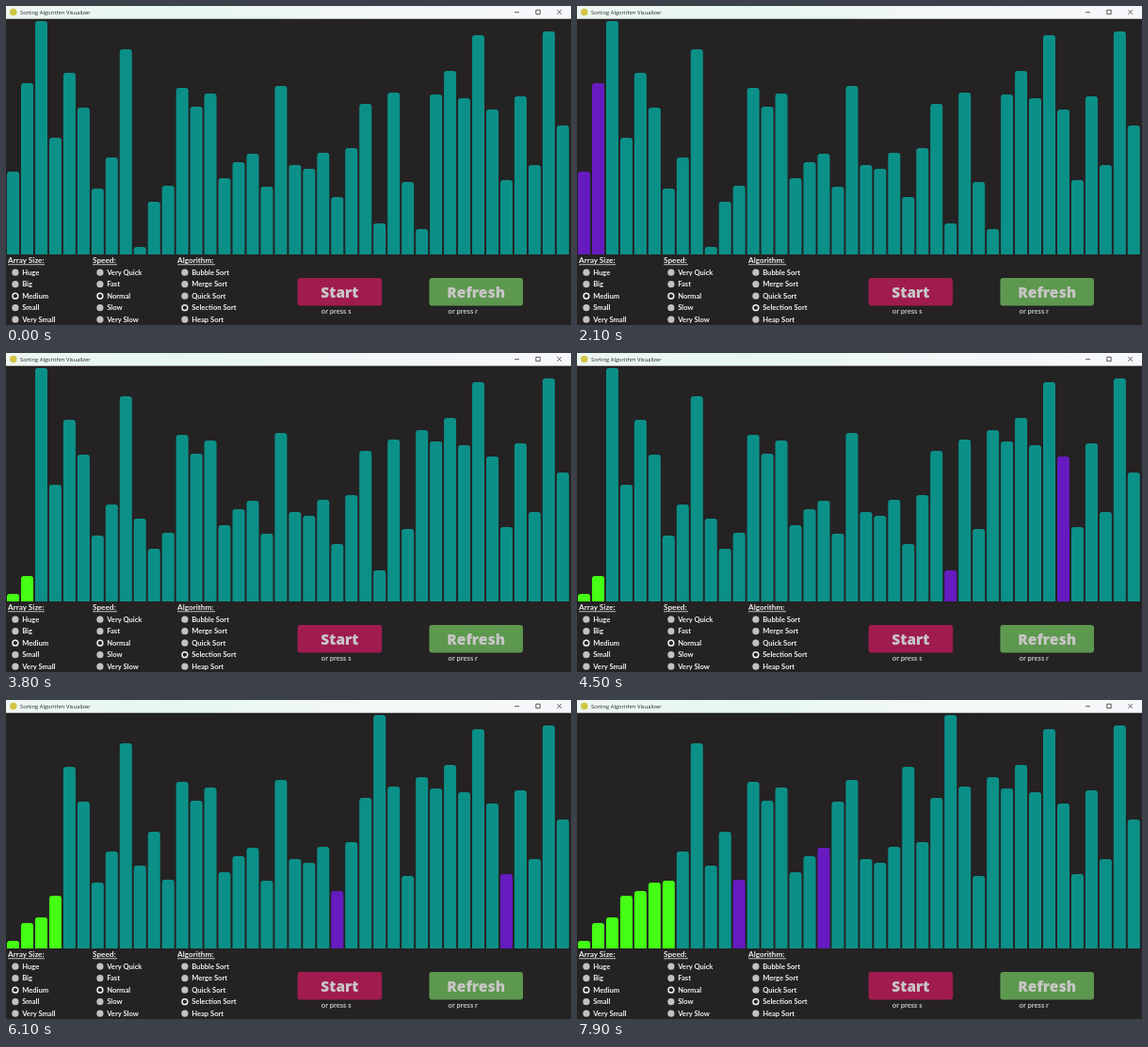
Recreate the animation shown at these times as an HTML page. Size 600 by 339 pixels, loop 8000 ms.

```html
<!DOCTYPE html>
<html lang="en">
<head>
<meta charset="utf-8">
<title>Sorting Algorithm Visualizer</title>
<style>
  html, body { margin: 0; width: 100%; height: 100%; overflow: hidden; background: #242223; }
  svg { display: block; width: 100vw; height: 100vh; }
  text { font-family: Lato, Carlito, sans-serif; font-weight: 700; font-size: 7.6px; fill: #f0f0f0; }
  .title { font-family: "Open Sans", "Noto Sans", sans-serif; font-weight: 400; font-size: 5.8px; fill: #222; }
  .heading { font-size: 8.2px; }
  .hint { fill: #c4c4c4; }
  .button { font-family: Impact, "Open Sans", "Noto Sans", sans-serif; font-weight: 800; font-stretch: 75%;
            font-size: 15.5px; fill: #c8c6c6; text-anchor: middle; }
</style>
</head>
<body>
<svg viewBox="0 0 600 339" preserveAspectRatio="none">
  <defs>
    <linearGradient id="bar">
      <stop offset="0" stop-color="#eef6f2"/>
      <stop offset=".3" stop-color="#e6f7f1"/>
      <stop offset=".65" stop-color="#f4f8f8"/>
      <stop offset="1" stop-color="#f6f7fa"/>
    </linearGradient>
  </defs>
  <rect width="600" height="339" fill="#242223"/>
  <rect width="600" height="13.7" fill="url(#bar)"/>
  <circle cx="7.8" cy="6.5" r="3.8" fill="#d2c544"/>
  <text class="title" x="15" y="8.8">Sorting Algorithm Visualizer</text>
  <path d="M540 6.7h5M562.8 4.3h4.4v4.4h-4.4zM585.3 4.2l4.6 4.6m0-4.6l-4.6 4.6" fill="none" stroke="#333" stroke-width=".8"/>
  <g id="bars"></g>
  <g id="panel"></g>
</svg>
<script>
const SVG = "http://www.w3.org/2000/svg";
const LOOP = 8000, FRAME = 100, FLOOR = 264;
const TEAL = "#0b9088", PURPLE = "#651bc0", GREEN = "#45ff14";

const tops = [176, 82, 16, 140, 71, 108, 194, 161, 46, 256, 208, 191, 87, 107, 93, 183, 166, 157, 192, 85,
  169, 173, 156, 203, 151, 104, 231, 92, 187, 237, 94, 69, 98, 31, 110, 185, 96, 169, 27, 127];

// Time in ms against number of sorting steps done.
const pace = [[2000, 0], [2100, 1], [3800, 79], [5200, 142], [6100, 185], [7100, 231], [7900, 269]];

function add(parent, tag, attrs, text) {
  const node = document.createElementNS(SVG, tag);
  for (const key in attrs) node.setAttribute(key, attrs[key]);
  if (text) node.textContent = text;
  return parent.appendChild(node);
}

function selectionSteps(list) {
  const a = [...list];
  const steps = [{ tops: [...a], sorted: 0, active: [] }];
  for (let i = 0; i < a.length - 1; i++) {
    let low = i;
    for (let j = i + 1; j < a.length; j++) {
      steps.push({ tops: [...a], sorted: i, active: [low, j] });
      if (a[j] > a[low]) low = j;
    }
    [a[i], a[low]] = [a[low], a[i]];
    steps.push({ tops: [...a], sorted: i + 1, active: [] });
  }
  return steps;
}

function stepAt(ms) {
  if (ms <= pace[0][0]) return 0;
  const k = pace.findIndex(([t]) => t >= ms);
  const [t0, s0] = pace[k - 1], [t1, s1] = pace[k];
  return Math.round(s0 + (s1 - s0) * (ms - t0) / (t1 - t0));
}

const panel = document.getElementById("panel");

function radioGroup(x, heading, underline, labels, chosen) {
  add(panel, "text", { class: "heading", x: x + 2, y: 273.2 }, heading);
  add(panel, "rect", { x: x + 2, y: 274.4, width: underline, height: .8, fill: "#e8e8e8" });
  labels.forEach((label, i) => {
    const y = 283.2 + i * 12.5, on = i === chosen;
    add(panel, "circle", {
      cx: x + 9.9, cy: y, r: on ? 2.9 : 3.6,
      fill: on ? "#242223" : "#c2c1c1", stroke: on ? "#eee" : "none", "stroke-width": 1.5
    });
    add(panel, "text", { x: x + 17.2, y: y + 2.6 }, label);
  });
}

function button(x, width, color, label, hint, hintX) {
  add(panel, "rect", { x, y: 289, width, height: 29.6, rx: 3, fill: color });
  add(panel, "text", { class: "button", x: x + width / 2, y: 309.5 }, label);
  add(panel, "text", { class: "hint", x: hintX, y: 327.2 }, hint);
}

radioGroup(0, "Array Size:", 39, ["Huge", "Big", "Medium", "Small", "Very Small"], 2);
radioGroup(90, "Speed:", 26, ["Very Quick", "Fast", "Normal", "Slow", "Very Slow"], 2);
radioGroup(180, "Algorithm:", 40, ["Bubble Sort", "Merge Sort", "Quick Sort", "Selection Sort", "Heap Sort"], 3);
button(309.6, 89.6, "#a01c4f", "Start", "or press s", 334.8);
button(449.4, 99.6, "#5d984f", "Refresh", "or press r", 469.6);

const steps = selectionSteps(tops);
const barGroup = document.getElementById("bars");
const bars = tops.map(() => add(barGroup, "path", {}));

function barPath(i, top) {
  const x = 1 + i * 14.97;
  return `M${x} ${FLOOR}V${top + 3}q0-3 3-3h7q3 0 3 3V${FLOOR}z`;
}

function draw(ms) {
  const step = steps[stepAt(Math.floor(ms / FRAME) * FRAME)];
  bars.forEach((bar, i) => {
    bar.setAttribute("d", barPath(i, step.tops[i]));
    bar.setAttribute("fill", step.active.includes(i) ? PURPLE : i < step.sorted ? GREEN : TEAL);
  });
}

const start = performance.now();
function tick() {
  draw((performance.now() - start) % LOOP);
  requestAnimationFrame(tick);
}
tick();
</script>
</body>
</html>
```
